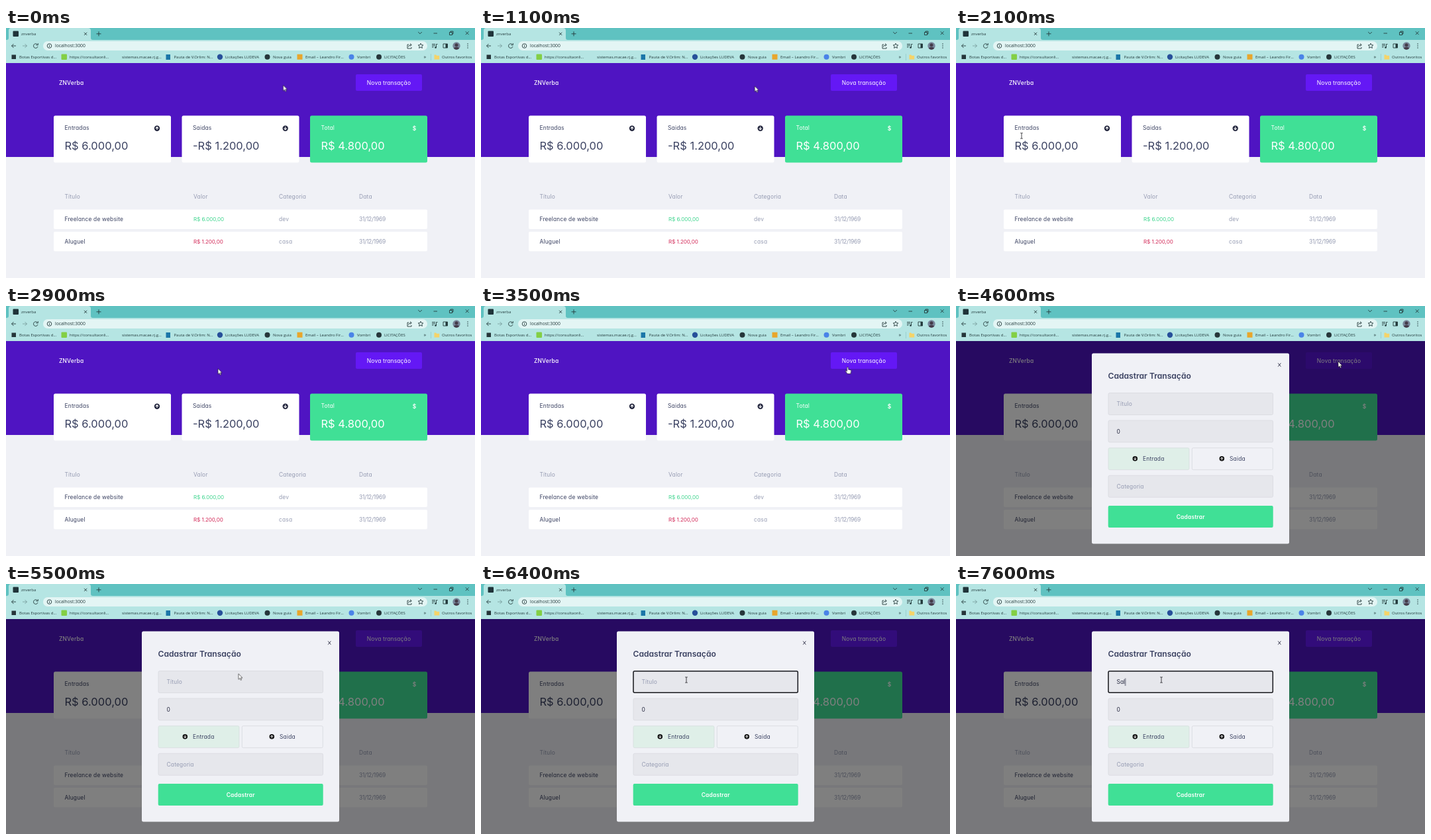
An HTML page for the animation above (8 s loop, 708 by 378 pixels).

```html
<!DOCTYPE html>
<html lang="pt-BR">
<head>
<meta charset="utf-8">
<title>Transações</title>
<style>
  html, body { margin: 0; width: 100%; height: 100%; overflow: hidden; }
  svg { display: block; width: 708px; height: 378px; }
  text { white-space: pre; }

  .chrome { font: 6px "Open Sans", "Noto Sans", sans-serif; fill: #22393b; }
  .chrome .url { font-size: 6.8px; }
  .line { fill: none; stroke: #243a3c; stroke-width: .9; }

  .page { font: 8.45px Inter, Lato, sans-serif; letter-spacing: .02em; font-feature-settings: "cv11"; fill: #3b4262; }
  .page .sum { font-size: 16.5px; letter-spacing: 0; }
  .page .money { font-size: 8.1px; letter-spacing: -.01em; }
  .page .date { letter-spacing: -.03em; }
  .page .head { font-size: 12.1px; font-weight: 600; letter-spacing: 0; }
  .brand { font-weight: 500; }
  .muted { fill: #969cb3; }
  .white { fill: #fff; }
  .card { fill: #fff; }
  .green { fill: #40e096; }
  .field { fill: #e6e7ec; stroke: #d6d7dd; stroke-width: .7; }

  [class^="t-"] { animation: 8s step-end infinite; }
  .t-modal { animation-name: modal; }
  .t-focus { animation-name: focus; }
  .t-hint { animation-name: hint; }
  .t-s { animation-name: typeS; }
  .t-a { animation-name: typeA; }
  .t-l { animation-name: typeL; }
  .t-blink { animation-name: blink; }
  .t-caret { animation-name: caret; }
  .t-arrow { animation-name: arrow; }
  .t-beam { animation-name: beam; }
  .t-hand { animation-name: hand; }
  .action { fill: #6418f5; animation: hover 8s linear infinite; }
  .pointer { animation: travel 8s ease-in-out infinite; }

  @keyframes modal { 0% { opacity: 0 } 57.5%, 100% { opacity: 1 } }
  @keyframes focus { 0% { opacity: 0 } 73.75%, 100% { opacity: 1 } }
  @keyframes hint { 0% { opacity: 1 } 88.75%, 100% { opacity: 0 } }
  @keyframes typeS { 0% { opacity: 0 } 88.75%, 100% { opacity: 1 } }
  @keyframes typeA { 0% { opacity: 0 } 92.5%, 100% { opacity: 1 } }
  @keyframes typeL { 0% { opacity: 0 } 95%, 100% { opacity: 1 } }
  @keyframes blink {
    0% { opacity: 0 } 73.75% { opacity: 1 } 80% { opacity: 0 } 86.25%, 100% { opacity: 1 }
  }
  @keyframes caret {
    0% { transform: none }
    88.75% { transform: translateX(5.6px) }
    92.5% { transform: translateX(10.4px) }
    95%, 100% { transform: translateX(12.6px) }
  }
  @keyframes arrow {
    0% { opacity: 1 } 25% { opacity: 0 } 30% { opacity: 1 } 42.5% { opacity: 0 }
    50% { opacity: 1 } 52.5% { opacity: 0 } 57.5% { opacity: 1 } 70%, 100% { opacity: 0 }
  }
  @keyframes beam {
    0% { opacity: 0 } 25% { opacity: 1 } 30% { opacity: 0 } 70%, 100% { opacity: 1 }
  }
  @keyframes hand {
    0% { opacity: 0 } 42.5% { opacity: 1 } 50% { opacity: 0 }
    52.5% { opacity: 1 } 57.5%, 100% { opacity: 0 }
  }
  @keyframes hover {
    0%, 43.75%, 51.25%, 52.5%, 60%, 100% { fill: #6418f5 }
    46.25%, 48.75%, 55%, 57.5% { fill: #5915d9 }
  }
  @keyframes travel {
    0%, 12.5% { transform: translate(418.5px, 86.5px) }
    26.25%, 28.75% { transform: translate(99px, 163px) }
    33.75% { transform: translate(285px, 95px) }
    43.75%, 48.75% { transform: translate(553.5px, 92px) }
    51.25% { transform: translate(568px, 109px) }
    53.75%, 56.25% { transform: translate(579.5px, 85px) }
    57.5%, 58.75% { transform: translate(577px, 84px) }
    72.5%, 100% { transform: translate(310px, 145px) }
  }
</style>
</head>
<body>
<svg viewBox="0 0 708 378">
  <defs>
    <g id="up">
      <circle r="4.2"/>
      <path d="M0 2.4V-2M-2.1 .1L0-2.1L2.1 .1" fill="none" stroke="#fff" stroke-width="1.1"/>
    </g>
    <g id="down"><use href="#up" transform="rotate(180)"/></g>
    <clipPath id="face"><circle cx="680" cy="27" r="5.7"/></clipPath>
  </defs>

  <g class="page">
    <rect y="53" width="708" height="325" fill="#f0f1f6"/>
    <rect y="53" width="708" height="142" fill="#4f14c2"/>
    <text class="brand white" x="80" y="86">ZNVerba</text>
    <rect class="action" x="528" y="70" width="100" height="25" rx="2"/>
    <text class="white" x="578" y="86" text-anchor="middle">Nova transação</text>

    <rect class="card" x="72" y="132.5" width="177" height="71" rx="2.5"/>
    <rect class="card" x="265.5" y="132.5" width="177" height="71" rx="2.5"/>
    <rect class="green" x="459" y="132.5" width="177" height="71" rx="2.5"/>
    <text x="88.5" y="154.3">Entradas</text>
    <text x="282" y="154.3">Saidas</text>
    <text class="white" x="475.5" y="154.3">Total</text>
    <use href="#up" x="228" y="151.7" fill="#25283f"/>
    <use href="#down" x="421.7" y="151.7" fill="#25283f"/>
    <text class="white" x="616.6" y="155" text-anchor="middle" font-weight="600">$</text>
    <text class="sum" x="88.5" y="184.3">R$ 6.000,00</text>
    <text class="sum" x="282" y="184.3">-R$ 1.200,00</text>
    <text class="sum white" x="475.5" y="184.3">R$ 4.800,00</text>

    <g class="muted">
      <text x="88.5" y="258">Título</text>
      <text x="283" y="258">Valor</text>
      <text x="412" y="258">Categoria</text>
      <text x="533" y="258">Data</text>
    </g>
    <rect class="card" x="72" y="274.5" width="564" height="29.5" rx="2"/>
    <rect class="card" x="72" y="308" width="564" height="29.5" rx="2"/>
    <text x="88.5" y="292">Freelance de website</text>
    <text x="88.5" y="325.7">Aluguel</text>
    <text class="money" x="283" y="292" fill="#40d58f">R$ 6.000,00</text>
    <text class="money" x="283" y="325.7" fill="#d32c5a">R$ 1.200,00</text>
    <g class="muted">
      <text x="412" y="292">dev</text>
      <text x="412" y="325.7">casa</text>
      <text class="date" x="533" y="292">31/12/1969</text>
      <text class="date" x="533" y="325.7">31/12/1969</text>
    </g>
  </g>

  <g class="t-modal">
    <g class="page">
      <rect y="53" width="708" height="325" opacity=".5" fill="#000"/>
      <rect x="205" y="71.5" width="298" height="288" rx="2.5" fill="#f0f1f6"/>
      <path d="M486.2 86.4l4.2 5.2m0-5.2l-4.2 5.2" stroke="#25283f" stroke-width=".9"/>
      <text class="head" x="229.5" y="110">Cadastrar Transação</text>

      <rect class="field" x="230" y="131.5" width="248.5" height="33" rx="2"/>
      <rect class="field" x="230" y="173" width="248.5" height="33" rx="2"/>
      <rect class="field" x="230" y="256.2" width="248.5" height="33" rx="2"/>
      <g class="t-focus">
        <rect x="230" y="131.7" width="248.3" height="32.6" rx="2" fill="none" stroke="#17181d" stroke-width="1.5"/>
      </g>
      <g class="t-hint"><text class="muted" x="242.5" y="151.3">Título</text></g>
      <g fill="#25283f">
        <text class="t-s" x="242.5" y="151.3">S</text>
        <text class="t-a" x="248.1" y="151.3">a</text>
        <text class="t-l" x="253" y="151.3">l</text>
        <g class="t-blink"><rect class="t-caret" x="242.6" y="142.5" width=".8" height="11.5"/></g>
        <text x="242.5" y="193">0</text>
      </g>
      <text class="muted" x="242.5" y="276">Categoria</text>

      <rect x="230" y="214.6" width="122" height="33" rx="2" fill="#dfefe8" stroke="#d3dcdb" stroke-width=".7"/>
      <rect x="356.3" y="214.6" width="122" height="33" rx="2" fill="#f0f1f6" stroke="#d3d5dc" stroke-width=".7"/>
      <use href="#down" transform="translate(270.3 230.8) scale(.9)" fill="#111"/>
      <use href="#up" transform="translate(401.3 230.8) scale(.9)" fill="#111"/>
      <text x="282" y="234.3">Entrada</text>
      <text x="413" y="234.3">Saida</text>

      <rect class="green" x="229.7" y="302" width="249" height="33" rx="2"/>
      <text class="white" x="354.2" y="321.7" text-anchor="middle" font-weight="600">Cadastrar</text>
    </g>
  </g>

  <g class="chrome">
    <rect width="708" height="53" fill="#b5e5e3"/>
    <rect width="708" height="18" fill="#5fc2c1"/>
    <path d="M1 18Q4 18 4 15V4Q4 0 8 0H124Q128 0 128 4V15Q128 18 131 18Z" fill="#b5e5e3"/>
    <rect x="10.5" y="4.5" width="8.5" height="8.5" rx="1" fill="#20343a"/>
    <text x="23" y="11.2">znverba</text>
    <path class="line" d="M118 6.7l4.2 4.2m0-4.2l-4.2 4.2M136.5 8.8h7M140 5.3v7M622.2 6l2.8 2.8L627.800 6M645.500 8h5.500M669.500 6.500h4v4h-4zM671 6.500V5h4v4h-1.500M693.800 5.300l4.800 4.800m0-4.800l-4.800 4.800"/>

    <path class="line" d="M15 27H8.500M11.500 24L8.500 27L11.500 30M47.300 24.900A3.300 3.300 0 1 0 48 28M48.300 23v2.800h-2.800"/>
    <path class="line" d="M25 27h6.500M28.500 24L31.500 27L28.500 30" opacity=".4"/>
    <rect x="56" y="20" width="580" height="14" rx="7" fill="#e3f5f4"/>
    <circle class="line" cx="65.500" cy="27" r="3.300" stroke-width=".8"/>
    <path class="line" d="M65.500 26.500v2.300M65.500 25v.800"/>
    <text class="url" x="74" y="29.400">localhost:3000</text>
    <path class="line" stroke-width=".7" d="M608 25h-2v6h6v-2M607.500 28.500q.500-3 4-3M610 23.500l2.300 2L610 27.500"/>
    <path class="line" stroke-width=".7" d="M626 23.200l1.100 2.400 2.700.300-2 1.800.600 2.700-2.400-1.400-2.400 1.400.600-2.700-2-1.800 2.700-.300z"/>
    <path class="line" d="M643 24.500h5M643 26.700h5M643 28.900h2.500M649.500 29.500v-5h2"/>
    <circle cx="648.500" cy="29.500" r="1.300"/>
    <path class="line" d="M660 24h6.500v6h-6.500z"/>
    <rect x="663.500" y="24" width="3" height="6"/>
    <g clip-path="url(#face)">
      <rect x="674" y="21" width="12" height="12" fill="#77869a"/>
      <circle cx="680" cy="25.800" r="2.500" fill="#443b49"/>
      <ellipse cx="680" cy="33" rx="5" ry="4.200" fill="#443b49"/>
    </g>
    <path d="M697 24v.010M697 27v.010M697 30v.010" stroke="#243a3c" stroke-width="1.500" stroke-linecap="round"/>

    <rect x="8.500" y="40.500" width="6.500" height="6.500" fill="#26363a"/>
    <text x="20" y="46">Botas Esportivas d...</text>
    <rect x="83.500" y="39.500" width="8.500" height="8.500" rx="1" fill="#83cf45"/>
    <text x="96" y="46">https://consultaonli...</text>
    <text x="175" y="46">sistemas.macae.rj.g...</text>
    <rect x="241.500" y="40" width="6.500" height="8" fill="#1b76a8"/>
    <text x="253.500" y="46">Pauta de V.Orlim: N...</text>
    <circle cx="323" cy="43.700" r="4.200" fill="#27509a"/>
    <text x="331" y="46">Licitações LUDEVA</text>
    <circle cx="394.500" cy="43.700" r="4" fill="#26363a"/>
    <text x="403" y="46">Nova guia</text>
    <rect x="439.500" y="39.700" width="8" height="8" fill="#e8a62c"/>
    <text x="452" y="46">Email – Leandro Fir...</text>
    <circle cx="521.500" cy="43.700" r="4" fill="#4a83e8"/>
    <text x="530" y="46">Vombri</text>
    <circle cx="563" cy="43.700" r="4" fill="#26363a"/>
    <text x="571" y="46">LICITAÇÕES</text>
    <text x="630.500" y="46" font-size="7.500">»</text>
    <path d="M641.500 39v10" stroke="#8ac3c2" stroke-width=".6"/>
    <path d="M646.500 40.500h2.700l1 1.200h4v5.800h-7.700z" fill="#f5d469"/>
    <text x="658" y="46">Outros favoritos</text>
  </g>

  <g class="pointer">
    <path class="t-arrow" d="M0 0V8.500L2 6.700L3.300 9.700L4.700 9.100L3.400 6.200H6Z" fill="#fff" stroke="#111" stroke-width=".6"/>
    <path class="t-beam" d="M-1.800-4.200H-.500Q0-4.200 0-3.500V3.500Q0 4.200-.500 4.200H-1.800M1.800-4.200H.500Q0-4.200 0-3.500M0 3.500Q0 4.200 .500 4.200H1.800" fill="none" stroke="#17181d" stroke-width=".8"/>
    <path class="t-hand" d="M-1 .800Q0-.500 1 .800V4L4.300 4.700Q5.300 5 5.200 6.200L4.500 10.500H-.300L-3 6.700Q-3.300 5.500-2.200 5.700L-1 6.700Z" fill="#fff" stroke="#111" stroke-width=".6"/>
  </g>
</svg>
</body>
</html>
```
